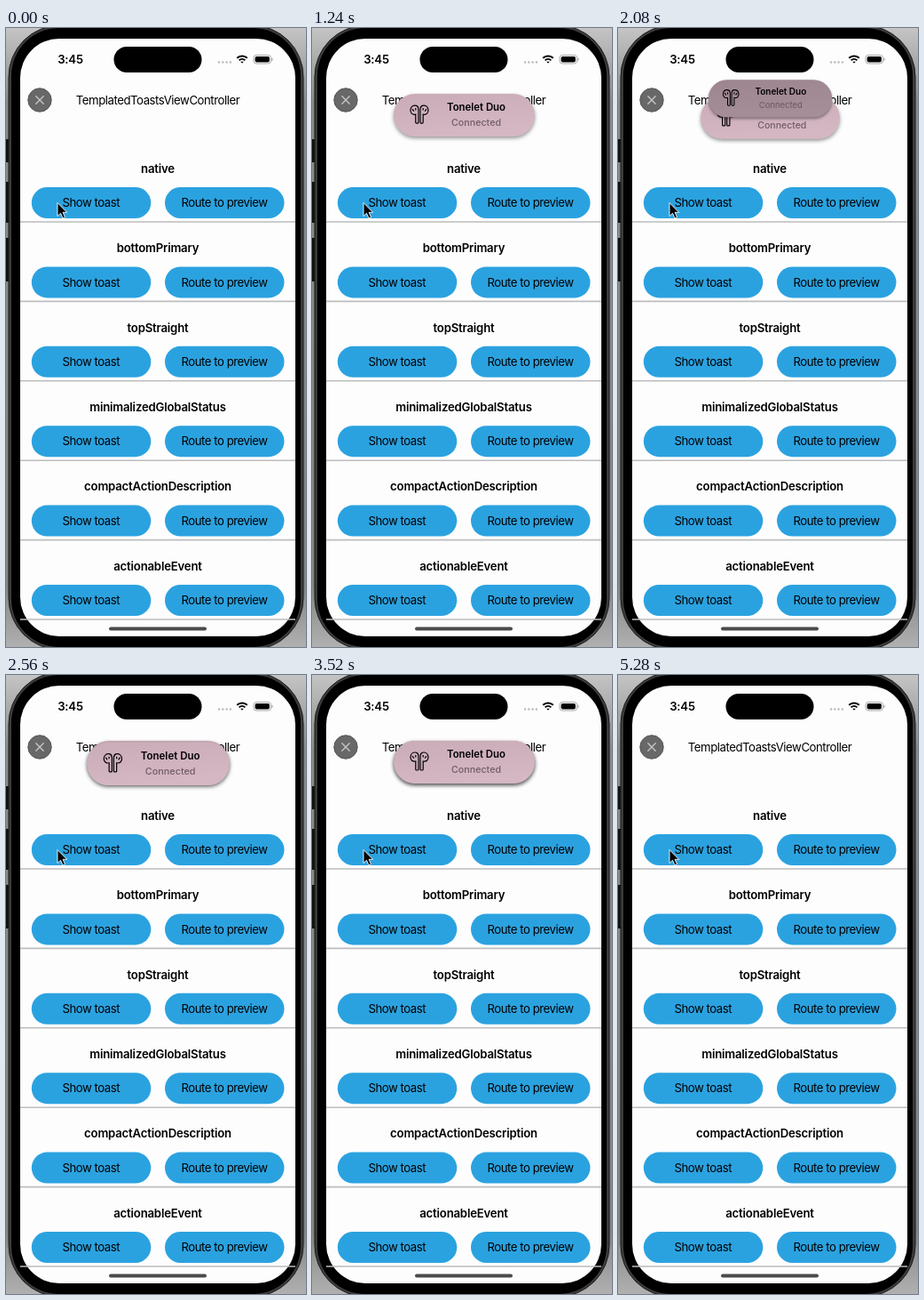
Recreate the animation shown at these times as an HTML page. Size 338 by 696 pixels, loop 5320 ms.

```html
<!DOCTYPE html>
<html lang="en">
<head>
<meta charset="utf-8">
<title>Toast stack</title>
<style>
  html, body { margin: 0; width: 100%; height: 100%; overflow: hidden; background: #888; }
  svg { display: block; width: 100vw; height: 100vh; }
  text { font: 13.2px Inter, "Liberation Sans", sans-serif; letter-spacing: -.46px; text-anchor: middle; }
  .bold { font-weight: 600; letter-spacing: -.2px; }
  .name { font-size: 11.4px; font-weight: 600; letter-spacing: 0; }
  .state { font-size: 10.7px; font-weight: 500; letter-spacing: 0; fill: #715d67; }
  .card { filter: drop-shadow(0 2px 2px rgba(0, 0, 0, .42)); }
</style>
</head>
<body>
<svg viewBox="0 0 338 696" preserveAspectRatio="none">
  <defs>
    <linearGradient id="desk" x2="0" y2="1">
      <stop stop-color="#c4c4c4"/><stop offset=".12" stop-color="#8c8c8c"/>
      <stop offset=".9" stop-color="#858585"/><stop offset="1" stop-color="#b0b0b0"/>
    </linearGradient>
    <linearGradient id="pink" x2=".3" y2="1">
      <stop stop-color="#caabb8"/><stop offset="1" stop-color="#d5b7c4"/>
    </linearGradient>
    <g id="toast">
      <rect class="card" x="-79.5" y="-24" width="159" height="48" rx="24" fill="url(#pink)"/>
      <rect class="shade" x="-79.5" y="-24" width="159" height="48" rx="24"/>
      <g transform="translate(-50.5 -1)" fill="none" stroke="#000" stroke-width="1.2">
        <path id="bud" d="M-4.2 0C-8 1-10.3-2-10-5C-9.7-8.5-7-10-5-10C-2.5-10-1-8-1-5.5V9a1 1 0 0 1-1 1H-3.2a1 1 0 0 1-1-1ZM-8-6l1.8 2.6M-4.2-7v2.5"/>
        <use href="#bud" transform="scale(-1 1)"/>
      </g>
      <text class="name" x="13.5" y="-4.6">Tonelet Duo</text>
      <text class="state" x="13.5" y="12">Connected</text>
    </g>
  </defs>

  <rect width="338" height="696" fill="url(#desk)"/>
  <path d="M0 125h4v26H0ZM0 173h4v46H0ZM0 236h4v49H0Z" fill="#111"/>
  <rect x="3" y="-3" width="332" height="702" rx="58" fill="#3d3d3d" stroke="#1c1c1c"/>
  <rect x="6" y="0" width="326" height="696" rx="54"/>
  <rect x="16" y="12" width="310" height="672" rx="44" fill="#fdfdfd"/>

  <text class="bold" x="72.5" y="40">3:45</text>
  <rect x="121.5" y="21" width="99" height="29" rx="14.5"/>
  <path d="M240 38.5h13" stroke="#bbb" stroke-width="2.6" stroke-linecap="round" stroke-dasharray="0 4.3"/>
  <g fill="none" stroke="#000" stroke-width="1.9">
    <path d="M260.2 33.8a8.3 8.3 0 0 1 11.6 0M262.6 36.4a5 5 0 0 1 6.8 0"/>
    <path d="M264.2 37.8h3.6L266 39.8Z" fill="#000" stroke="none"/>
  </g>
  <rect x="279" y="30.5" width="19.5" height="9.5" rx="3" fill="none" stroke="#aaa"/>
  <rect x="280.6" y="32" width="16.3" height="6.5" rx="1.8"/>
  <path d="M300 33.7v3" stroke="#aaa" stroke-width="1.2"/>

  <circle cx="38" cy="81" r="13.2" fill="#686868" stroke="#555"/>
  <path d="M33.8 76.8l8.4 8.4m0-8.4l-8.4 8.4" stroke="#c4c4c4" stroke-width="1.4" stroke-linecap="round"/>
  <text x="171" y="85.6">TemplatedToastsViewController</text>

  <g id="rows"></g>
  <rect x="116" y="673.5" width="110" height="4" rx="2" fill="#4b4b4b"/>
  <g id="toasts"></g>
  <path d="M58 196.5v15l3.5-3.2 2.5 5.6 2.6-1.2-2.5-5.4h4.6Z" stroke="#fff" stroke-width=".9"/>
</svg>
<script>
const LOOP = 5320;
const $ = id => document.getElementById(id);
const clamp = v => Math.max(0, Math.min(1, v));

const button = (x, y, label) =>
  `<g><rect x="${x}" y="${y}" width="134.5" height="35" rx="17.5" fill="#2ba2e0"/>
   <text x="${x + 67}" y="${y + 22.2}">${label}</text></g>`;

$('rows').innerHTML = ['native', 'bottomPrimary', 'topStraight', 'minimalizedGlobalStatus',
  'compactActionDescription', 'actionableEvent'].map((name, i) => {
    const y = 179 + 89.4 * i;
    return `<text class="bold" x="171" y="${y - 16.2}">${name}</text>` +
      button(28.8, y, 'Show toast') + button(179, y, 'Route to preview') +
      `<path d="M16 ${y + 39}H326" stroke="#bdbdbd" stroke-width="1.6"/>`;
  }).join('');
const pressed = document.querySelector('#rows g');

// Lifetimes in ms; the later toast lies on top
const toasts = [{ show: 100, hide: 3700 }, { show: 1790, hide: 4650 }].map(life => {
  const el = $('toast').cloneNode(true);
  el.removeAttribute('id');
  $('toasts').append(el);
  return { ...life, el, shade: el.querySelector('.shade') };
});

// Underdamped step response
function spring(ms) {
  if (ms <= 0) return 0;
  const damp = .735, w = 6.8, s = ms / 1000, q = Math.sqrt(1 - damp * damp);
  const a = w * q * s;
  return 1 - Math.exp(-damp * w * s) * (Math.cos(a) + damp / q * Math.sin(a));
}

// Brief dimming of a tapped button
const tap = ms => ms < 0 ? 0 : ms < 80 ? 1 : clamp(1 - (ms - 80) / 180);

function draw(t) {
  pressed.setAttribute('opacity', 1 - .25 * Math.max(tap(t - 40), tap(t - 1690)));
  toasts.forEach(({ show, hide, el, shade }, i) => {
    const p = t < hide ? spring(t - show) : Math.max(0, 1 - spring(t - hide));
    // The lower toast gives way while the next one drops in
    const push = i ? 0 : Math.sin(Math.PI * clamp((t - 1790) / 600));
    const y = 35.5 + 62.5 * p + 3 * push;
    const size = .59 + .41 * p - .015 * push;
    el.setAttribute('transform', `translate(171.5 ${y}) scale(${size})`);
    el.setAttribute('visibility', p > .01 ? 'visible' : 'hidden');
    shade.setAttribute('opacity', clamp(1 - 1.72 * (p - .25)));
  });
}

const start = performance.now();
function tick() {
  draw((performance.now() - start) % LOOP);
  requestAnimationFrame(tick);
}
tick();
</script>
</body>
</html>
```
